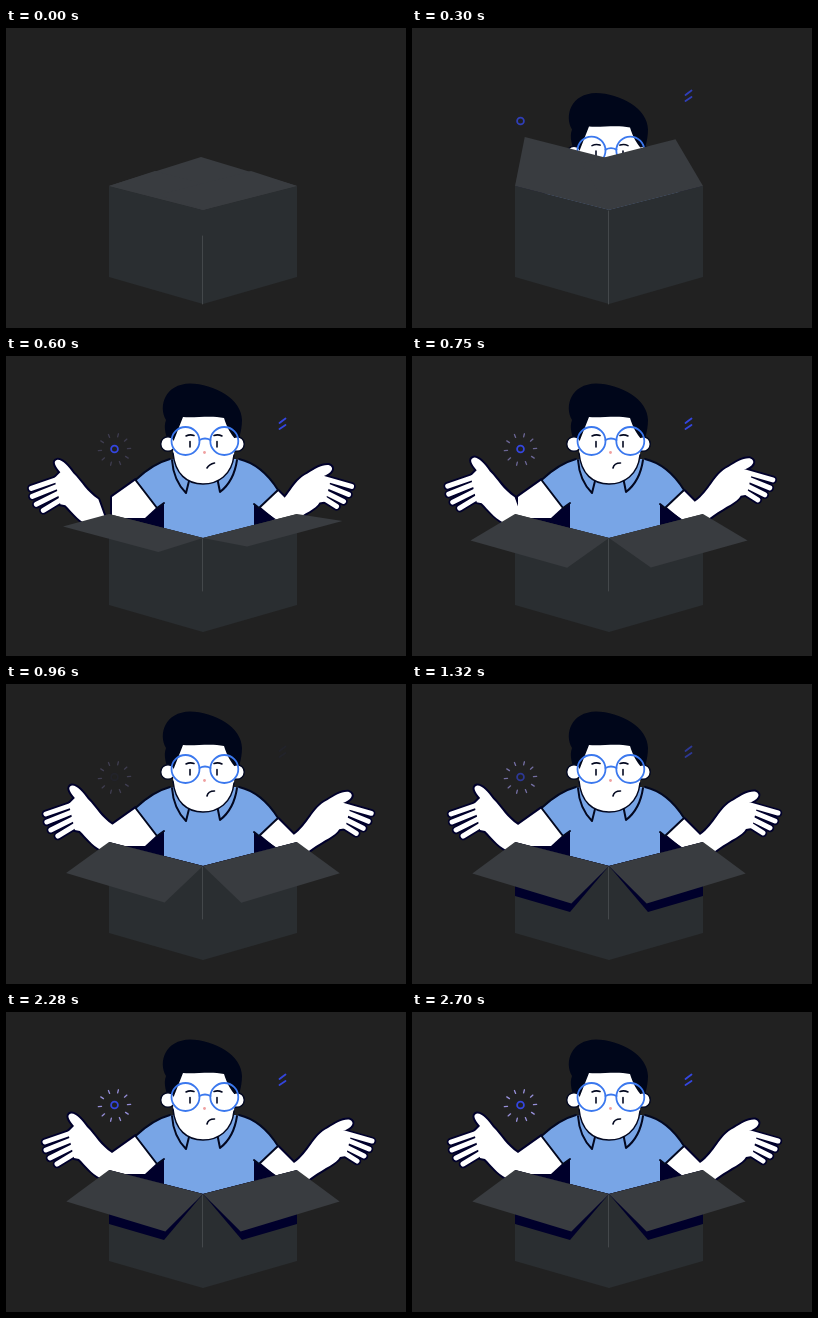
An HTML page with a canvas that plays this animation: 400x300 px, repeating every 2730 ms.

```html
<!DOCTYPE html>
<html lang="en">
<head>
<meta charset="utf-8">
<title>Shrug in a box</title>
<style>
html, body { margin: 0; width: 100%; height: 100%; overflow: hidden; background: #212121; }
canvas { display: block; }
</style>
</head>
<body>
<canvas id="stage" width="400" height="300"></canvas>
<script>
const ctx = document.getElementById('stage').getContext('2d');
const LOOP = 2730, STEP = 30;
const BG = '#212121', SIDE = '#2a2e31', FLAP = '#393c40', NAVY = '#00002b',
  HAIR = '#00061a', INK = '#030820', SHIRT = '#78a5e6', BLUE = '#3b78ee', ICON = '#3446e0';

// Box top corners: left, front, right, back
const A = [103, 158], M = [197, 182], B = [291, 158], T = [195, 129];

const lerp = (a, b, u) => a + (b - a) * u;
const ramp = (t, from, to) => Math.min(1, Math.max(0, (t - from) / (to - from)));
// Slow start, soft landing: 0 to 1
const settle = (t, tau, power) => 1 - Math.exp(-Math.pow(t / tau, power));

const poly = (...pts) => new Path2D('M' + pts.join('L') + 'Z');
const add = (p, v) => [p[0] + v[0], p[1] + v[1]];

function draw(path, fill, stroke, width = 1.8) {
  const p = typeof path === 'string' ? new Path2D(path) : path;
  if (fill) { ctx.fillStyle = fill; ctx.fill(p); }
  if (stroke) { ctx.strokeStyle = stroke; ctx.lineWidth = width; ctx.stroke(p); }
}

function circle(x, y, r, ...paint) {
  const p = new Path2D();
  p.arc(x, y, r, 0, 2 * Math.PI);
  draw(p, ...paint);
}

function icons(t) {
  const pulse = Math.min(1, .75 + .75 * Math.cos((t - 180) / 500 * 2 * Math.PI));
  ctx.globalAlpha = pulse * ramp(t, 30, 150);
  circle(108.5, 93, 3.4, null, ICON);
  draw('M273.5 67L279.5 62.5M273.5 73L279.5 69', null, ICON);

  ctx.globalAlpha = (.2 + .7 * pulse) * ramp(t, 500, 900);
  ctx.save();
  ctx.translate(108.5, 93.5);
  ctx.rotate(-.07);
  for (let i = 0; i < 10; i++) {
    draw('M13 0H16.2', null, '#a59df0', 1.3);
    ctx.rotate(Math.PI / 5);
  }
  ctx.restore();
  ctx.globalAlpha = 1;
}

const LEFT_ARM = {
  upper: new Path2D('M130 124L106 141V162H139L152 150Z'),
  fore: new Path2D('M120 180L106 141C94 133 90 124 81 115C76 108 70 101 65 101.5C60 103 63 108 68 114L62 120L68 146L73 147C80 154 85 161 94 166Z'),
  fingers: new Path2D('M68 120L39 130M70 126L40 138M72 132L44 146M74 138L51 152')
};
const RIGHT_ARM = {
  upper: new Path2D('M272 135L288 151V164H270L252 149Z'),
  fore: new Path2D('M285 180L288 151C304 140 306 124 322 116C330 111 336 107 343 107.5C350 110 346 116 337 119L345 123L340 144L334 145C330 152 320 155 306 165Z'),
  fingers: new Path2D('M338 121L366 129M336 126L363 137M334 132L358 144M332 137L351 149')
};

function arm({ upper, fore, fingers }, dx, dy) {
  const shifted = paint => {
    ctx.save();
    ctx.translate(dx, dy);
    paint();
    ctx.restore();
  };
  draw(upper, null, NAVY, 4);
  shifted(() => {
    draw(fore, null, NAVY, 4);
    draw(fingers, null, NAVY, 8.5);
  });
  draw(upper, '#fff');
  shifted(() => {
    draw(fore, '#fff');
    draw(fingers, null, '#fff', 5);
  });
}

// Both hands spring out of the box from 80 px inside it
function arms(t) {
  const s = t - 450;
  if (s < -30) return;
  const swing = Math.exp(-s / 130) * Math.cos(s / 70);
  const lag = Math.exp(-s / 110);
  arm(LEFT_ARM, 80 * swing, 80 * swing * swing);
  arm(RIGHT_ARM, -80 * lag, 80 * lag * Math.cos(s / 100));
}

function man(t) {
  ctx.save();
  ctx.clip(poly([0, 0], [400, 0], [400, 158], B, M, A, [0, 158]));
  ctx.translate(0, 155 * (1 - settle(t, 275, 4)));

  draw('M158 146L134 168L158 190ZM248 148L274 166L248 190Z', NAVY);
  draw('M164 103C149 107 139 115 129.5 124L151 152L158 147V190H248V148L253 152L272 134C262 118 250 107 233 103Z', SHIRT);
  draw('M164 103C149 107 139 115 129.5 124L151 152L158 147M233 103C250 107 262 118 272 134L253 152L248 148', null, INK, 2);
  draw('M166 104C167 118 172 129 180 137L184 121M231 104C229 118 223 129 214 136L211 121', SHIRT, INK, 2);

  draw('M165 94C160 80 157 72 160 64C152 50 159 28 184 27.5C208 28 236 43 236 64C236 76 232 84 231 92Z', HAIR);
  circle(162, 88, 7.3, '#fff', INK, 1.5);
  circle(231, 88, 7.3, '#fff', INK, 1.5);
  const jaw = 'M228 99C226 119 212 128 197 128C181 128 169 118 167 97';
  draw(jaw + 'L168 84L177 61C190 62 205 59 218 62C221 72 225 78 229 83Z', '#fff');
  draw(jaw, null, INK, 1.5);

  draw('M180 80Q184 78 188 79.500M208 79.500Q212 78 216 80M184 85.500V91M211 85.500V91', null, INK, 1.6);
  circle(198.5, 96.5, 1.4, '#f0a0a0');
  circle(179.5, 85, 14, null, BLUE);
  circle(218.3, 85, 14, null, BLUE);
  draw('M193.500 84Q199 81 204.500 84', null, BLUE);
  const frown = ramp(t, 510, 630);
  draw(`M201 112Q${lerp(207, 202, frown)} ${lerp(112, 107, frown)} 208.500 107`, null, INK, 1.6);
  ctx.restore();
}

// A flap's edge swings over an ellipse; side is 1 for left, -1 for right
function flapEdge(side, opened) {
  const a = opened * 202 * Math.PI / 180;
  return [side * 46 * Math.cos(a), -15 * Math.cos(a) - 47 * Math.sin(a)];
}

function box(t) {
  draw(poly(A, M, [197, 276], [103, 249]), SIDE);
  draw(poly(M, B, [291, 249], [197, 276]), SIDE);
  const seam = ramp(t, 300, 450);
  draw(`M196.500 ${lerp(208, 183, ramp(t, 0, 300))}V${lerp(276, 235, seam)}`, null, '#4c5052', .8);

  if (t >= 960) {
    const drop = 20 * (1 - ramp(t, 1020, 1230));
    draw(poly(A, [103, 212 - drop], [158, 228 - drop], M), NAVY);
    draw(poly(B, [291, 212 - drop], [236, 228 - drop], M), NAVY);
  }

  const left = flapEdge(1, settle(t, 423, 2.1));
  const right = flapEdge(-1, settle(t, 473, 2.6));
  const skew = ramp(t, 450, 1020);
  const inner = side => add(M, [side * 5 * skew, 6 * skew]);
  draw(poly(A, add(A, left), add(inner(1), left), M), FLAP);
  draw(poly(M, add(inner(-1), right), add(B, right), B), FLAP);
}

function frame() {
  const t = Math.floor(performance.now() % LOOP / STEP) * STEP;
  ctx.lineCap = ctx.lineJoin = 'round';
  ctx.fillStyle = BG;
  ctx.fillRect(0, 0, 400, 300);
  icons(t);
  draw(poly(A, T, B, M), t < 240 ? FLAP : NAVY);
  arms(t);
  man(t);
  box(t);
  requestAnimationFrame(frame);
}
frame();
</script>
</body>
</html>
```
